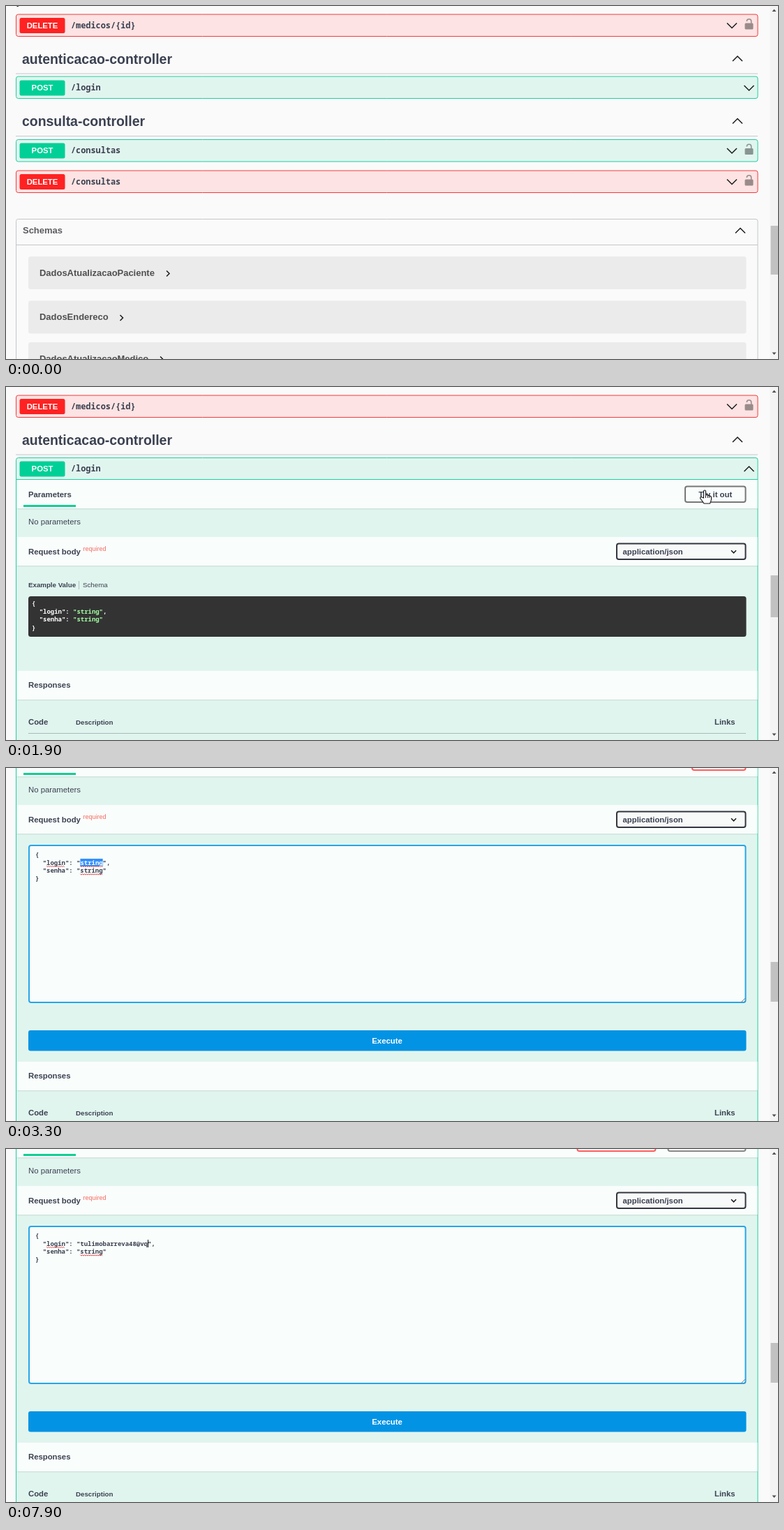
Animation of 1106x506 px, one loop 8 s. Source, as an HTML page with a canvas:

```html
<!DOCTYPE html>
<html lang="pt">
<head>
<meta charset="utf-8">
<title>API docs</title>
<style>
  html, body { margin: 0; width: 100%; height: 100%; overflow: hidden; background: #fafafa; }
  canvas { display: block; }
</style>
</head>
<body>
<canvas id="stage" width="1106" height="506"></canvas>
<script>
const ctx = document.getElementById('stage').getContext('2d');
const LOOP = 8000, STEP = 100;
const OPEN = 900, LOADED = 1100, EDIT = 2100, CURSOR_OFF = 2200, SCROLL = 2400, FOCUS = 2800;
const SCROLL_BY = 162, CHAR = 5.37;
const INK = '#3b4151', GREEN = '#1ecf9f', RED = '#f5393d', MINT = '#e1f5ef', PALE = '#f9fdfc';
const LOGIN = 'tulimobarreva48@vq';
const KEYS = [4000, 4200, 4300, 4500, 4600, 5000, 5100, 5300, 5500,
  5700, 5800, 5900, 6000, 6300, 6700, 7000, 7600, 7900];
// time, x, y of the pointer tip
const PATH = [[0, 10, -18], [100, 10, -18], [800, 291, 118], [900, 291, 121], [1000, 291, 147],
  [1200, 291, 147], [1500, 600, 27], [1900, 1001, 148], [LOOP, 1001, 148]];
// start time, thumb top, thumb bottom
const THUMBS = [[0, 315, 385], [OPEN, 303, 370], [LOADED, 270, 330], [EDIT, 260, 318], [SCROLL, 278, 335]];

const ARROW = new Path2D('M0 0V16L3.7 12.6L6.2 18.6L8.6 17.6L6.1 11.8H11.2Z');
const HAND = new Path2D('M-1.5 11V1.5C-1.5-.5 1.5-.5 1.5 1.5V7Q4 5.5 4.5 7.5Q7 6.5 7 8.5Q9.5 8 9.5 10V13' +
  'Q9 16 7.5 19H-1Q-3 16-6.5 11.5Q-6.5 9-4 10Z');

const sans = (size, weight = 'bold') => `${weight} ${size}px "Liberation Sans", Arial, sans-serif`;
const mono = (size, weight = 600) => `${weight} ${size}px "Noto Sans Mono", monospace`;

function text(str, x, y, font, color = INK, align = 'left') {
  ctx.font = font;
  ctx.fillStyle = color;
  ctx.textAlign = align;
  ctx.fillText(str, x, y);
}

function fill(x, y, w, h, color) {
  ctx.fillStyle = color;
  ctx.fillRect(x, y, w, h);
}

function box(x, y, w, h, r, color, border, width = 1) {
  ctx.beginPath();
  ctx.roundRect(x, y, w, h, r);
  if (color) { ctx.fillStyle = color; ctx.fill(); }
  if (border) { ctx.strokeStyle = border; ctx.lineWidth = width; ctx.stroke(); }
}

function line(points, color = '#1b1b1b', width = 1.5) {
  ctx.beginPath();
  points.forEach(([x, y]) => ctx.lineTo(x, y));
  ctx.strokeStyle = color;
  ctx.lineWidth = width;
  ctx.stroke();
}

// dir: 1 points down, -1 points up
const chevron = (x, y, dir, w = 7, h = 3.5) =>
  line([[x - w, y - h * dir], [x, y + h * dir], [x + w, y - h * dir]]);

function lock(y) {
  ctx.globalAlpha = .42;
  box(1058.5, y - 2, 12, 9, 1.5, '#111');
  ctx.beginPath();
  ctx.arc(1064.5, y - 4.5, 3.2, Math.PI, 0);
  ctx.lineTo(1067.7, y - 2);
  ctx.strokeStyle = '#111';
  ctx.lineWidth = 1.6;
  ctx.stroke();
  ctx.globalAlpha = 1;
}

function label(y, verb, path) {
  box(19.5, y + 5.5, 65, 22, 2.5, verb === 'POST' ? '#00d097' : '#ff2222');
  text(verb, 52, y + 20, sans(11.34), '#fff', 'center');
  text(path, 93, y + 20, mono(11.88));
}

function row(y, verb, path) {
  const post = verb === 'POST';
  box(14.5, y + .5, 1062.5, 31.5, 3, post ? '#e1f5ef' : '#fde3e3', post ? GREEN : RED);
  label(y, verb, path);
  chevron(1040, y + 16.5, 1);
  lock(y + 15);
}

function heading(y, title) {
  text(title, 23, y + 7, sans(19.45));
  chevron(1048, y, -1);
  fill(14, y + 21, 1063, 1, '#c6c8cc');
}

function lowerPage(dy) {
  ctx.save();
  ctx.translate(0, dy);
  heading(165, 'consulta-controller');
  row(191, 'POST', '/consultas');
  row(235.5, 'DELETE', '/consultas');
  box(14.5, 305.5, 1062.5, 400, 3, null, '#c4c6ca');
  text('Schemas', 24, 326, sans(12.96), '#5c5c60');
  chevron(1052, 322, -1);
  fill(15, 342, 1062, 1, '#c4c6ca');
  [['DadosAtualizacaoPaciente', 359, 232], ['DadosEndereco', 422.5, 165.5], ['DadosAtualizacaoMedico', 482, 223]]
    .forEach(([name, y, x]) => {
      box(32, y, 1028.5, 47, 3.5, '#ebebeb');
      text(name, 48, y + 27.5, sans(12.96), '#505050');
      line([[x - 2, y + 20.5], [x + 2, y + 24.5], [x - 2, y + 28.5]]);
    });
  ctx.restore();
}

function band(y, h = 41) {
  fill(15.5, y, 1061, h, PALE);
  fill(15.5, y + h, 1061, 1, 'rgba(0,0,0,.08)');
  fill(15.5, y + h + 1, 1061, 1, 'rgba(0,0,0,.03)');
}

function button(x, w, str, color, border) {
  box(x + 1, 142.5, w - 2, 22.5, 3, PALE, border, 2);
  text(str, x + w / 2, 157.5, sans(11.34), color, 'center');
}

function squiggle(x, chars, y) {
  const points = [];
  for (let i = 0; i <= chars * CHAR; i += 1.5) points.push([x + i, y + (i / 1.5 % 2 ? 1 : -.5)]);
  line(points, '#e8383d', 1);
}

function grid(str, x, y, color = INK, font = mono(8.95)) {
  text(str, x, y, font, color);
}

function example() {
  text('Example Value', 32, 286.5, sans(9.72));
  fill(104, 278, 1, 12, '#b3c0be');
  text('Schema', 110, 286.5, sans(9.72, 'normal'));
  box(32, 300, 1028.5, 58, 3.5, '#333');
  const font = mono(8.95, 'bold');
  grid('{', 37, 313, '#fff', font);
  ['login', 'senha'].forEach((key, i) => {
    const y = 325 + i * 11.4;
    grid(`  "${key}":`, 37, y, '#fff', font);
    grid('"string"', 37 + 11 * CHAR, y, '#a2fca2', font);
    if (!i) grid(',', 37 + 19 * CHAR, y, '#fff', font);
  });
  grid('}', 37, 348, '#fff', font);
}

function editor(t) {
  const focus = t >= FOCUS, typed = KEYS.filter(k => k <= t).length;
  const value = typed ? LOGIN.slice(0, typed) : 'string';
  const x = focus ? 42 : 40, y = focus ? 289.3 : 288, start = x + 12 * CHAR;
  if (focus) box(33, 273, 1026.5, 225, 3, PALE, '#27a5ea', 2);
  else box(32, 272, 1028.5, 227.5, 3.5, PALE);
  line([[1053, 498], [1059, 492]], '#777', 1);
  line([[1057, 498], [1059, 496]], '#777', 1);

  grid('{', x, y);
  grid(`  "login": "${value}",`, x, y + 11.4);
  grid('  "senha": "string"', x, y + 22.8);
  grid('}', x, y + 33.6);
  if (!focus) return;

  squiggle(x + 3 * CHAR, 5, y + 13.5);
  squiggle(start, 6, y + 24.9);
  let caret = start;
  if (typed) {
    caret += typed * CHAR;
  } else {
    const picked = Math.min(6, Math.ceil((t - FOCUS) / 500 * 6));
    fill(start, 292, picked * CHAR, 11, '#3390ff');
    grid(value.slice(0, picked), start, y + 11.4, '#fff');
    squiggle(start, 6, y + 13.5);
    caret += picked * CHAR;
  }
  const idle = typed ? t - KEYS[typed - 1] : t >= 3300 ? 500 : 0;
  if (idle < 500) fill(Math.round(caret), 292, 1, 11, '#111');
}

function form(t) {
  const edit = t >= EDIT, answers = edit ? 583 : 407;
  box(14.5, 101.5, 1062.5, 900, 3, MINT, GREEN);
  fill(15, 132, 1062, 1, GREEN);
  label(101, 'POST', '/login');
  chevron(1064.5, 117.5, -1);

  band(133);
  text('Parameters', 32, 157.5, sans(11.34));
  fill(25, 169, 75, 3, '#12cf94');
  if (!edit) {
    button(972, 88.5, 'Try it out', INK, t >= 1900 ? '#777' : '#999');
  } else if (t < KEYS[0]) {
    button(982, 78.5, 'Cancel', '#f84848', '#ff5c5c');
  } else {
    button(817.5, 114, 'Cancel', '#f84848', '#ff5c5c');
    button(947.5, 113, 'Reset', INK, '#888');
  }
  text('No parameters', 32, 196.5, sans(11.34, 'normal'));

  band(215);
  text('Request body', 32, 239.5, sans(11.34));
  text('required', 110.5, 235, sans(9, 'normal'), '#f8685f');
  box(875, 224.5, 184.5, 22.5, 3, '#f8f9f9', '#33363f', 2);
  text('application/json', 883.5, 239.5, sans(11.34));
  chevron(1042.5, 236, 1, 3.5, 1.8);

  if (edit) {
    editor(t);
    box(32, 538, 1028.5, 29.5, 3, '#0393e4');
    text('Execute', 546, 557, sans(11.34), '#fff', 'center');
  } else {
    example();
  }

  band(answers);
  text('Responses', 32, answers + 24, sans(11.34));
  text('Code', 32, answers + 77, sans(11.34));
  text('Description', 100, answers + 76.5, sans(9.72));
  text('Links', 1015, answers + 77, sans(11.34));
  fill(32, answers + 89, 1028, 1, '#a9b8b8');
}

function loginRow(t, hover) {
  const open = t >= OPEN, x = hover ? 1038 : 1064.5;
  box(14.5, 101, 1062.5, open ? 169 : 31.5, 3, MINT, GREEN);
  if (open) {
    fill(15, 132, 1062, 1, GREEN);
    const a = (t - 1000) / 1000 * 2 * Math.PI;
    ctx.beginPath();
    ctx.arc(546, 185, 9, a + .1, a + 1.5 * Math.PI);
    ctx.strokeStyle = '#555';
    ctx.lineWidth = 2.6;
    ctx.stroke();
  }
  label(101, 'POST', '/login');
  if (open) box(19.5, 105.5, 1026, 23, 2.5, null, '#1c2b2c', 2);
  chevron(x, 117.5, open ? -1 : 1);
  if (hover) {
    box(1050, 107, 19, 20.5, 3, '#7d8293');
    box(1055.5, 112, 7.5, 10.5, 1, null, '#fff');
    fill(1057, 110.5, 4.5, 2.5, '#fff');
    line([[1066, 117.5], [1059, 117.5], [1061, 115.5]], '#fff', 1);
  }
}

function pointer(t) {
  const i = PATH.findIndex(p => p[0] > t);
  const [t0, x0, y0] = PATH[i - 1], [t1, x1, y1] = PATH[i];
  const k = (t - t0) / (t1 - t0);
  return [x0 + (x1 - x0) * k, y0 + (y1 - y0) * k];
}

function drawPointer(x, y, hand) {
  const shape = hand ? HAND : ARROW;
  ctx.save();
  ctx.translate(x, y);
  ctx.fillStyle = '#fff';
  ctx.strokeStyle = '#111';
  ctx.lineWidth = 1.1;
  ctx.fill(shape);
  ctx.stroke(shape);
  if (hand) [1.5, 4.5, 7].forEach(f => line([[f, 7.5], [f, 11]], '#111', 1));
  ctx.restore();
}

function scrollbar(t) {
  const [, top, bottom] = THUMBS.filter(s => s[0] <= t).pop();
  fill(1094.5, 0, 11.5, 506, '#f4f4f4');
  fill(1095.5, top, 10.5, bottom - top, '#c1c1c1');
  [[8, -1], [496.5, 1]].forEach(([y, dir]) => {
    ctx.beginPath();
    ctx.moveTo(1097.5, y);
    ctx.lineTo(1103.5, y);
    ctx.lineTo(1100.5, y + 3.5 * dir);
    ctx.fillStyle = '#505050';
    ctx.fill();
  });
}

function draw(t) {
  const [px, py] = pointer(t);
  const onLogin = t < LOADED && py >= 101 && py <= 147;
  fill(0, 0, 1106, 506, '#fafafa');
  ctx.save();
  if (t >= SCROLL) ctx.translate(0, -SCROLL_BY);
  row(11.5, 'DELETE', '/medicos/{id}');
  heading(75.5, 'autenticacao-controller');
  if (t < LOADED) {
    loginRow(t, onLogin);
    lowerPage(t >= OPEN ? 137 : 0);
  } else {
    form(t);
  }
  ctx.restore();
  scrollbar(t);
  if (t < CURSOR_OFF) {
    const onRow = (py >= 12 && py <= 44) || (py >= 101 && py <= 131);
    drawPointer(px, py, onLogin || onRow || (px > 972 && py > 140));
  }
}

function frame() {
  draw(Math.floor(performance.now() % LOOP / STEP) * STEP);
  requestAnimationFrame(frame);
}
frame();
</script>
</body>
</html>
```
